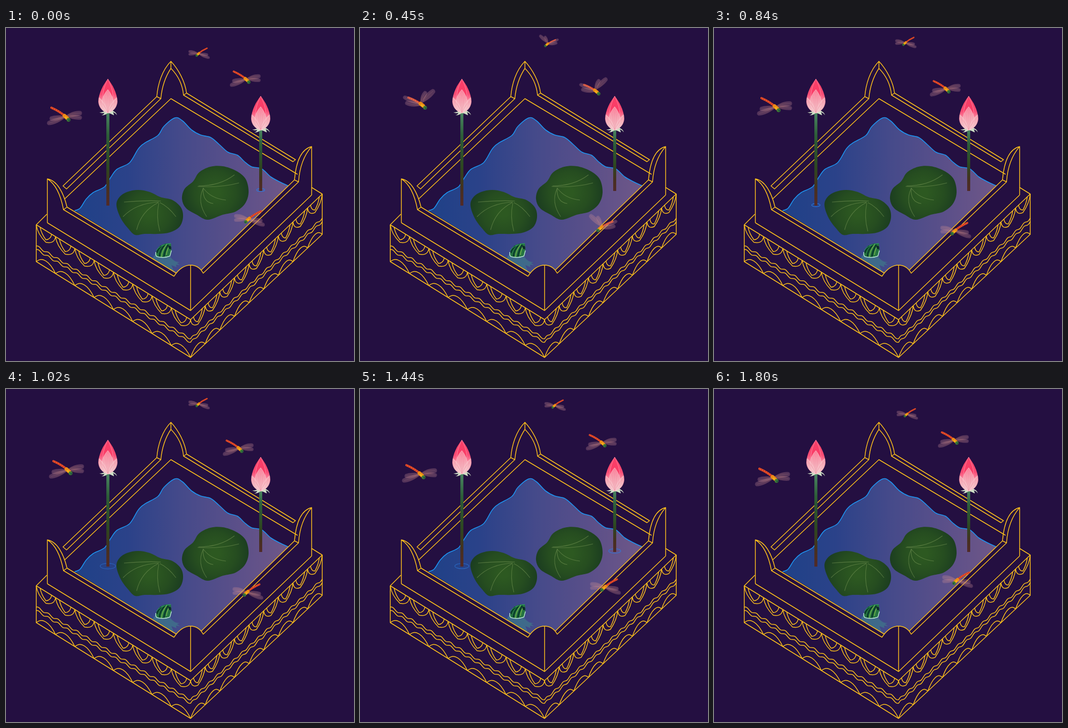
Animation of 690 by 660 pixels, one loop 1830 ms. Source, as an HTML page with a canvas:

```html
<!DOCTYPE html>
<html>
<head>
<meta charset="utf-8">
<title>Lotus pond</title>
<style>
html, body { margin: 0; width: 100%; height: 100%; overflow: hidden; background: #240f41; }
canvas { display: block; }
</style>
</head>
<body>
<canvas id="stage" width="690" height="660"></canvas>
<script>
const W = 690, H = 660, LOOP = 1830, STEP = 30;
const GOLD = '#fdc01c';
const view = document.getElementById('stage').getContext('2d');

function layer(draw) {
  const c = document.createElement('canvas');
  c.width = W;
  c.height = H;
  draw(c.getContext('2d'));
  return c;
}

// Smooth curve through points given as a flat list
function smooth(p, closed) {
  const n = p.length / 2;
  const at = i => {
    i = closed ? (i + n) % n : Math.max(0, Math.min(n - 1, i));
    return [p[2 * i], p[2 * i + 1]];
  };
  let d = 'M' + at(0);
  for (let i = 0; i < (closed ? n : n - 1); i++) {
    const [a, b, c, e] = [at(i - 1), at(i), at(i + 1), at(i + 2)];
    d += `C${b[0] + (c[0] - a[0]) / 6},${b[1] + (c[1] - a[1]) / 6} ` +
         `${c[0] - (e[0] - b[0]) / 6},${c[1] - (e[1] - b[1]) / 6} ${c}`;
  }
  return d + (closed ? 'Z' : '');
}

function fade(g, box, stops) {
  const grad = box.length === 4 ? g.createLinearGradient(...box) : g.createRadialGradient(...box);
  stops.forEach(([k, c]) => grad.addColorStop(k, c));
  return grad;
}

function fill(g, d, style) {
  g.fillStyle = style;
  g.fill(new Path2D(d));
}

function line(g, d, style, width) {
  g.strokeStyle = style;
  g.lineWidth = width;
  g.stroke(new Path2D(d));
}

// ---- Basin ----
const shore = [136,362, 147,357, 159,339, 173,326, 195,315, 207,297, 220,280, 245,267, 262,240,
  275,228, 301,213, 313,195, 335,178, 350,184, 368,202, 386,212, 406,217, 423,231, 440,246,
  459,252, 473,265, 487,275, 507,279, 525,295, 545,306, 560,313];
const pool = smooth(shore) + 'L387,480 Q378,470 366,470 Q350,471 338,486 Z';

function drawWater(g) {
  fill(g, pool, fade(g, [136, 0, 560, 0],
    [[0, '#1f4187'], [0.25, '#2b4289'], [0.5, '#454a8a'], [0.75, '#5a4f89'], [1, '#6f5788']]));
  line(g, smooth(shore), '#1d95f2', 1.6);
}

// Repeats a motif along a slanted edge; the motif uses u (0..1) and v (pixels down)
function along(x0, y0, x1, y1, count, motif) {
  const dx = (x1 - x0) / count, dy = (y1 - y0) / count;
  let d = '';
  for (let i = 0; i < count; i++) {
    d += motif((u, v) => `${x0 + (i + u) * dx},${y0 + (i + u) * dy + v} `);
  }
  return d;
}

const petal = p =>
  `M${p(0, 0)}C${p(0.04, 11)}${p(0.22, 19)}${p(0.5, 23)}C${p(0.78, 19)}${p(0.96, 11)}${p(1, 0)}` +
  `M${p(0.2, 0)}C${p(0.24, 8)}${p(0.35, 14)}${p(0.5, 18)}C${p(0.65, 14)}${p(0.76, 8)}${p(0.8, 0)}`;
const arch = p => `M${p(0, 0)}C${p(0.2, -11)}${p(0.34, -13)}${p(0.5, -13)}C${p(0.66, -13)}${p(0.8, -11)}${p(1, 0)}`;
const ripple = p => `M${p(0, 0)}C${p(0.2, -2.6)}${p(0.3, -2.6)}${p(0.5, 0)}C${p(0.7, 2.6)}${p(0.8, 2.6)}${p(1, 0)}`;

function drawBasin(g) {
  const walls = [
    // back finial
    'M299,136C301,112 309,84 327,66C342,82 355,106 358,129L352,133C350,112 341,94 327,80C315,98 309,118 307,140Z M327,66V80',
    // back walls
    'M299,136L113,313L120,319L307,140 M116,339L327,140L578,290 M358,129L574,261L569,265L352,133',
    // left finial
    'M82,386V299C101,302 114,326 121,355L114,360C109,334 100,310 82,299',
    // right finial
    'M606,331V235C585,240 575,266 572,301L580,305C582,276 591,252 606,235',
    // front walls
    'M114,360L333,492C343,477 354,470 366,470C378,470 386,477 391,486L580,305',
    'M121,355L338,486 M572,301L387,480 M366,470V560 M82,386L366,560L606,331',
    // base
    'M81,369L60,390L366,578L627,329L606,316 M60,390V463L366,653L627,409V329',
    along(60, 390, 366, 578, 8, petal),
    along(366, 578, 627, 329, 9, petal),
    along(60, 463, 366, 653, 8, arch),
    along(366, 653, 627, 409, 9, arch)
  ];
  for (const y of [432, 439]) {
    walls.push(along(60, y, 366, y + 184, 16, ripple), along(366, y + 184, 627, y - 55, 16, ripple));
  }
  g.lineJoin = 'round';
  walls.forEach(d => line(g, d, GOLD, 1.5));
}

// ---- Pond life ----
function drawLeaf(g, edge, cx, cy, veins) {
  const d = smooth(edge, true);
  fill(g, d, fade(g, [cx, cy, 8, cx, cy, 68], [[0, '#2d5921'], [0.55, '#264d20'], [1, '#1b3d20']]));
  veins.forEach(v => line(g, v, 'rgba(122,154,88,.55)', 1.1));
}

function drawLeaves(g) {
  drawLeaf(g, [219,351, 225,335, 240,325, 262,321, 285,325, 306,335, 330,341, 347,356, 351,375,
    344,394, 325,405, 300,408, 275,408, 256,410, 242,397, 227,376], 285, 366,
    ['M307,343Q280,341 234,345', 'M303,345Q258,347 232,374', 'M302,346Q268,363 259,400',
     'M303,347Q297,374 305,403', 'M305,346Q322,354 337,374']);
  drawLeaf(g, [349,339, 354,319, 371,304, 383,286, 405,275, 430,274, 456,283, 475,299, 481,325,
    474,348, 455,364, 430,370, 400,380, 378,370, 357,357], 415, 326,
    ['M382,313Q424,313 453,291', 'M380,314Q425,317 462,307', 'M391,317Q406,338 436,341',
     'M391,317Q389,345 411,348', 'M391,318Q378,345 398,374']);
}

function drawFrog(g) {
  g.save();
  g.clip(new Path2D(pool));
  fill(g, 'M296,448Q290,456 286,468L338,492Q330,476 328,470L338,474L337,469L345,470L339,466L344,464Q333,464 326,454Z',
    'rgba(62,140,140,.5)');
  const head = 'M297,452Q297,439 305,432Q315,426 327,427Q329,441 326,452Q311,457 297,452Z';
  fill(g, head, '#267541');
  g.clip(new Path2D(head));
  ['M304,454Q304,440 317,428', 'M313,456Q313,444 322,429', 'M299,446Q301,438 308,432']
    .forEach(d => line(g, d, '#0b3c2b', 3));
  ['M308,455Q309,441 319,428', 'M318,450Q319,440 324,432'].forEach(d => line(g, d, '#74b24b', 1.5));
  fill(g, 'M322,432Q328,430 328,438Q322,440 322,432Z', '#0d2b2b');
  g.restore();
  line(g, 'M297,444Q296,450 299,453Q312,457 325,452L328,441', '#b7e4d3', 1.5);
  line(g, 'M298,441Q304,430 327,427', '#2ea568', 1);
}

function drawLotus(g, dx, dy, stemEnd) {
  g.save();
  g.translate(dx, dy);
  const end = stemEnd - dy;
  g.fillStyle = fade(g, [0, 166, 0, end], [[0, '#4c8765'], [0.25, '#2d5d38'], [0.6, '#2e4620'], [0.82, '#463020'], [1, '#512a29']]);
  g.fillRect(199, 166, 6, end - 166);
  fill(g, 'M199,162Q193,168 185,167Q190,170 195,168Q194,172 189,173Q198,173 202,168Q209,170 214,173Q214,170 212,167Q217,168 220,173Q219,166 207,162Z', '#cfe0c6');
  fill(g, 'M202,101C193,112 184,128 183,146C184,158 191,165 202,169C213,165 220,158 221,146C220,128 211,112 202,101Z',
    fade(g, [0, 101, 0, 168], [[0, '#fa3f64'], [0.45, '#fb4d76'], [0.68, '#fa93a9'], [1, '#f6c3ca']]));
  fill(g, 'M202,101C209,114 212,126 211,137L202,122L193,137C193,125 196,112 202,101Z', '#f93e68');
  line(g, 'M202,101C196,113 192,125 192,138 M202,101C208,113 212,125 212,138', '#ff8fa7', 0.8);
  const blush = fade(g, [0, 122, 0, 168], [[0, '#fb7f99'], [0.4, '#f7a0b0'], [1, '#f4c9ce']]);
  for (const s of [-1, 1]) {
    fill(g, `M${202 + s * 18},137C${202 + s * 20},153 ${202 + s * 13},164 202,169C${202 + s * 3},156 ${202 + s * 8},144 ${202 + s * 18},137Z`, blush);
  }
  fill(g, 'M202,122C194,131 190,140 191,149C193,159 197,165 202,169C207,165 211,159 213,149C213,140 209,131 202,122Z', blush);
  line(g, 'M202,122C194,131 190,140 191,149Q194,161 202,169Q210,161 213,149C213,140 209,131 202,122 M184,139Q197,147 202,169Q207,147 220,139',
    'rgba(255,214,218,.8)', 0.7);
  line(g, 'M202,132V168 M198,137Q198,154 202,168 M206,137Q206,154 202,168 M187,146Q197,155 202,168 M217,146Q207,155 202,168',
    'rgba(236,116,143,.55)', 0.6);
  g.restore();
}

// ---- Dragonflies ----
// Wings: root x, y, tip x, y, width
const poses = [
  { tail: [-29, -18], head: [5, 6], wings: [[0, 0, -38, 14, 10], [-1, -1, -33, 4, 10], [0, -2, 32, -8, 10], [1, 0, 32, 2, 9]] },
  { tail: [-27, -14], head: [6, 6], wings: [[-1, -1, -38, -16, 9], [0, 1, -34, -4, 10], [-3, -4, 8, -27, 9], [-1, -3, 25, -30, 11]] }
];

function drawWing(g, [x, y, tx, ty, w]) {
  const len = Math.hypot(tx - x, ty - y);
  g.save();
  g.translate(x, y);
  g.rotate(Math.atan2(ty - y, tx - x));
  const d = `M0,0C${len * 0.3},${-w * 0.55} ${len * 0.7},${-w * 0.7} ${len * 0.95},${-w * 0.35}` +
    `Q${len * 1.04},0 ${len * 0.93},${w * 0.4}C${len * 0.65},${w * 0.6} ${len * 0.3},${w * 0.4} 0,0Z`;
  fill(g, d, fade(g, [0, 0, len, 0], [[0, 'rgba(214,140,130,.38)'], [1, 'rgba(190,135,150,.3)']]));
  line(g, `M2,0Q${len * 0.5},${-w * 0.25} ${len * 0.9},0`, 'rgba(225,165,150,.2)', 0.8);
  g.restore();
}

function drawFly(g, x, y, sx, sy, pose) {
  const { tail: [tx, ty], head: [hx, hy], wings } = pose;
  g.save();
  g.translate(x, y);
  g.scale(sx, sy);
  g.lineCap = 'round';
  const body = `M${tx},${ty}Q${tx * 0.45},${ty * 0.62} 0,0`;
  line(g, body, '#e84f25', 4.4);
  g.lineCap = 'butt';
  g.setLineDash([1, 3.2]);
  line(g, body, '#b02a2a', 3.8);
  g.setLineDash([]);
  wings.forEach(w => drawWing(g, w));
  g.lineCap = 'round';
  line(g, `M-3,-2L${hx * 0.4},${hy * 0.4}`, '#ec8b16', 7.5);
  line(g, `M-1,1L${hx * 0.3},${hy * 0.5}`, '#f4b31b', 3.5);
  g.fillStyle = '#3f7c32';
  g.beginPath();
  g.arc(hx, hy, 3.8, 0, 7);
  g.fill();
  g.fillStyle = '#1d5148';
  g.beginPath();
  g.arc(hx + 1.3, hy + 0.8, 1.8, 0, 7);
  g.fill();
  g.restore();
}

const times = [0, 210, 450, 690, 1020, 1440];
const flies = [
  { size: 1, dir: 1, x: [119, 121, 123, 123, 123, 121], y: [176, 164, 152, 154, 161, 169] },
  { size: 0.88, dir: 1, x: [477, 478, 468, 462, 463, 481], y: [102, 114, 125, 123, 118, 107] },
  { size: 0.61, dir: -1, x: [381, 376, 371, 376, 381, 385], y: [51, 43, 32, 30, 30, 33] },
  { size: 0.88, dir: -1, x: [480, 479, 477, 477, 477, 484], y: [379, 383, 396, 400, 403, 393] }
];

// Periodic cubic through the values at the shared times
function glide(v, t) {
  const n = times.length;
  const time = i => times[(i + n) % n] + Math.floor(i / n) * LOOP;
  const val = i => v[(i + n) % n];
  const slope = i => (val(i + 1) - val(i - 1)) / (time(i + 1) - time(i - 1));
  let i = n - 1;
  while (times[i] > t) i--;
  const span = time(i + 1) - time(i), k = (t - time(i)) / span, r = 1 - k;
  return r * r * (1 + 2 * k) * val(i) + k * k * (3 - 2 * k) * val(i + 1) +
    span * k * r * (r * slope(i) - k * slope(i + 1));
}

// ---- Rings on the water: centre and starting time ----
const rings = [[505, 321, 0], [505, 321, 1335], [202, 351, 830], [202, 351, 1283]];

function drawRing(g, [x, y, start], t) {
  const age = t - start;
  if (age < 0 || age > 420) return;
  const r = 8 + age * 0.038;
  g.globalAlpha = Math.min(1, 1.05 - age / 420);
  g.strokeStyle = '#2d79dc';
  g.lineWidth = 1.2;
  g.beginPath();
  g.ellipse(x, y, r, r * 0.37, 0, 0, 7);
  g.stroke();
  g.globalAlpha = 1;
}

const back = layer(g => {
  g.fillStyle = '#240f41';
  g.fillRect(0, 0, W, H);
  drawWater(g);
  drawLeaves(g);
  drawFrog(g);
  drawBasin(g);
});
const blooms = layer(g => {
  drawLotus(g, 0, 0, 352);
  drawLotus(g, 303, 34, 323);
});

function frame(now) {
  const n = Math.floor((now % LOOP) / STEP), t = n * STEP;
  view.drawImage(back, 0, 0);
  rings.forEach(r => drawRing(view, r, t));
  view.drawImage(blooms, 0, 0);
  for (const f of flies) {
    drawFly(view, glide(f.x, t), glide(f.y, t), f.size * f.dir, f.size, poses[n % 2]);
  }
}

let began;
function tick(now) {
  if (began === undefined) began = now;
  frame(Math.max(0, now - began));
  requestAnimationFrame(tick);
}
frame(0);
requestAnimationFrame(tick);
</script>
</body>
</html>
```
